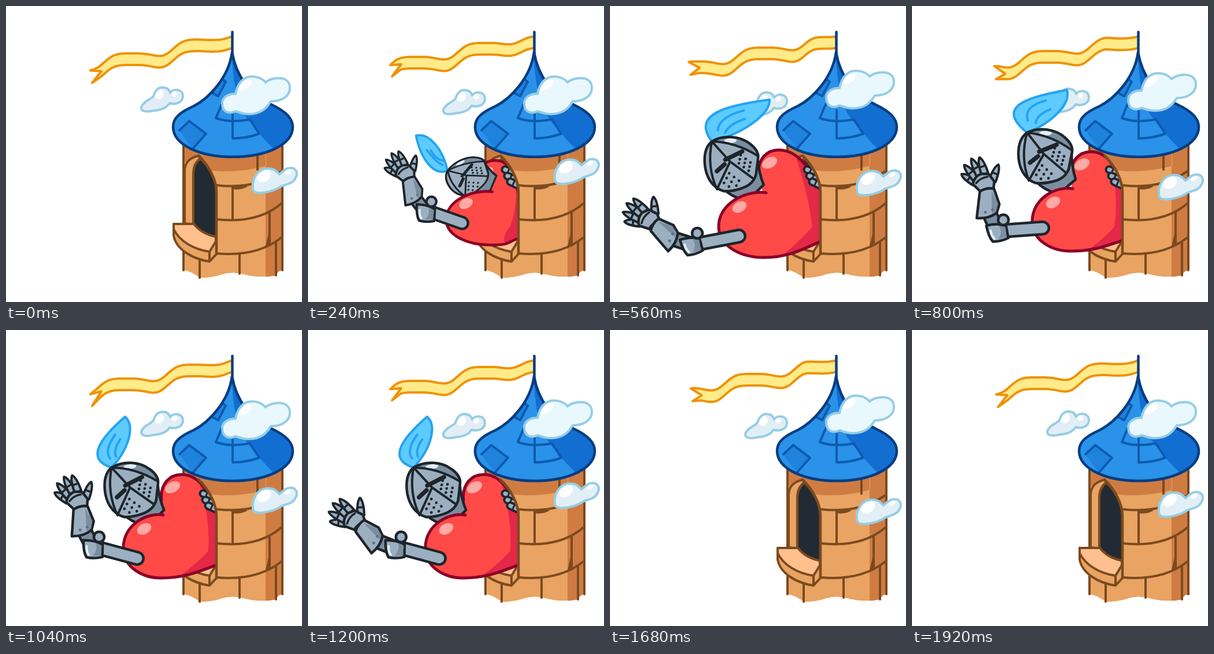
These frames come from a looping animation (512 by 512 pixels, 2000 ms). An HTML page with a canvas:

```html
<!DOCTYPE html>
<html lang="en">
<head>
<meta charset="utf-8">
<title>Knight at the tower</title>
<style>
html, body { margin: 0; width: 100%; height: 100%; overflow: hidden; background: #fff; }
canvas { display: block; width: 100vmin; height: 100vmin; }
</style>
</head>
<body>
<canvas id="stage" width="512" height="512"></canvas>
<script>
const c = document.getElementById('stage').getContext('2d');
const STEP = 80, COUNT = 25, TAU = Math.PI * 2, DEG = Math.PI / 180;
const BROWN = '#7b4a1f', STONE = '#e9a362', SHADE = '#cf7c43';
const INK = '#1d252b', STEEL = '#9bafc0', DARK_STEEL = '#7b8e9f';

function draw(shape, fill, line, width = 4) {
  const p = typeof shape === 'string' ? new Path2D(shape) : shape;
  if (fill) { c.fillStyle = fill; c.fill(p); }
  if (line) { c.strokeStyle = line; c.lineWidth = width; c.stroke(p); }
}
function oval(x, y, rx, ry, turn, fill, line, width) {
  const p = new Path2D();
  p.ellipse(x, y, rx, ry, turn, 0, TAU);
  draw(p, fill, line, width);
}
function scoped(fn) { c.save(); fn(); c.restore(); }
const lerp = (a, b, k) => a + (b - a) * k;
const wave = (f, peak) => Math.cos(TAU * (f - peak) / 12);

// Eased value between [frame, value] keys; values are numbers or arrays
function keyed(keys, f) {
  let i = 0;
  while (i < keys.length - 2 && f > keys[i + 1][0]) i++;
  const [a, va] = keys[i], [b, vb] = keys[i + 1];
  const x = Math.min(1, Math.max(0, (f - a) / (b - a)));
  const k = x * x * (3 - 2 * x);
  return Array.isArray(va) ? va.map((v, n) => lerp(v, vb[n], k)) : lerp(va, vb, k);
}

function flag(f) {
  const end = 141 + 5 * wave(f, 0.5);
  const crest = 314 - 10 * f;
  const mid = x => {
    const grip = Math.min(1, (390 - x) / 55);
    const a = TAU * (x - crest) / 120;
    // the cosine term leans the wave to one side
    return 63 + (390 - x) * 0.2 - 9 * grip * Math.cos(a + 0.5 * (Math.cos(a) - 1));
  };
  const p = new Path2D();
  p.moveTo(390, mid(390) - 10);
  for (let x = 386; x > end + 5; x -= 4) p.lineTo(x, mid(x) - 10);
  p.lineTo(end, mid(end) - 9);
  p.lineTo(end + 19, mid(end + 19) + 1);
  p.lineTo(end + 3, mid(end + 3) + 13);
  for (let x = end + 18; x < 390; x += 4) p.lineTo(x, mid(x) + 10);
  p.lineTo(390, mid(390) + 10);
  draw(p, '#ffeb8a', '#f09104', 4);
}

function tower() {
  const wall = new Path2D('M307 235V457Q318 458 335 470Q355 471 375 464Q392 459 410 464Q440 472 467 466Q470 458 478 457V235Z');
  scoped(() => {
    c.clip(wall);
    draw(wall, STONE);
    draw('M449 230H480V480H449Z M307 235V268Q330 284 375 286Q420 286 450 276V235Z', SHADE);
  });
  draw('M307 240V457M478 240V457M335 432V470M404 430V463M467 408V466M435 259V283M392 314V368M456 358V414' +
    'M364 310Q430 318 476 286M364 369Q436 377 477 341M307 424Q340 433 365 428Q435 434 477 400', null, BROWN, 4);
  draw('M392 317Q408 319 418 312L394 312ZM449 415L456 386V413Z', BROWN);
  draw('M309 376V285C309 270 320 262 333 259L340 270L326 378Z', STONE, BROWN);
  draw('M324 377V290C324 278 329 269 336 264C352 278 364 302 364 322V400Q338 394 324 377Z', '#222b33', BROWN);
  draw('M290 377V397C294 420 320 437 352 442L364 429V400Z', STONE, BROWN);
  draw('M290 377H325Q338 394 363 399V407L352 425C325 421 300 407 290 386Z', '#ffc08d', BROWN);
  draw('M352 425V441', null, BROWN);
}
function jamb() {
  draw('M333 259C350 275 364 300 364 322V429', null, BROWN, 4.5);
}

function roof() {
  const p = new Path2D('M391 80C385 125 350 160 325 173C300 184 289 194 289 209C289 240 335 261 392 261C450 261 496 240 496 209C496 190 475 178 460 171C420 152 398 120 391 80Z');
  const line = '#0c5bb0', tile = '#1f82dc';
  scoped(() => {
    c.clip(p);
    draw(p, '#2a92e9');
    draw('M390 70Q392 150 410 185Q435 220 464 248L510 230V150Z', '#126ed1');
    draw('M354 149L367 156L380 131L370 123', tile, line);
    draw('M300 215L317 199L346 221L323 247', tile, line);
    draw('M373 170L363 194Q378 199 392 199V229Q416 229 438 221L422 196Q408 199 392 199V180', null, line);
  });
  draw(p, null, '#073d82', 4.5);
  draw('M391.500 45V84', null, '#073d82', 4.5);
}

const clouds = {
  big: ['M374 168C374 158 385 151 397 152C400 135 410 122 425 122C438 122 446 128 449 132C460 122 490 120 491 140C492 155 478 165 458 165C450 178 440 187 420 187C408 187 401 183 397 182C387 187 374 185 374 168Z',
    '#e9f8fd', [413, 136, 13, 7]],
  left: ['M234 175C237 165 250 162 255 156C258 145 265 140 272 141C280 141 283 147 284 150C290 142 306 143 306 156C306 168 292 171 283 168C277 178 265 180 255 181C243 184 233 183 234 175Z',
    '#e2eef6', [264, 152, 9, 9], [291, 152, 5, 5]],
  right: ['M427 315C425 300 435 281 453 281C465 281 468 286 473 291C480 285 484 280 493 280C503 281 505 290 501 297C496 308 485 308 476 312C465 320 445 324 437 323C430 323 427 320 427 315Z',
    '#e2eff7', [446, 294, 13, 10], [488, 287, 6, 4]]
};
function cloud([path, fill, ...lights], dy) {
  scoped(() => {
    c.translate(0, dy);
    const p = new Path2D(path);
    draw(p, fill);
    scoped(() => {
      c.clip(p);
      for (const [x, y, rx, ry] of lights) oval(x, y, rx, ry, -0.6, '#fff');
    });
    draw(p, null, '#95cde5', 4);
  });
}

// cleft x y, lobe width, bottom, top x y | head x y turn sx sy | plume tip x y bend | shoulder x y, elbow x y
const tuck = [317, 320, 84, 417, 322, 263, 273, 291, -32, .84, .68, 178, 218, 0, 262, 377, 197, 357];
const lunge = [273, 334, 90, 446, 273, 248, 199, 294, -6, 1, 1, 257, 184, 1, 223, 420, 147, 457];
const lean = [270, 323, 82, 435, 292, 249, 211, 273, -4, 1, 1, 276, 162, 1.6, 223, 398, 142, 412];
const rest = [278, 316, 70, 424, 310, 252, 231, 260, 0, 1, 1, 268, 145, 2.2, 226, 384, 149, 389];
const settle = [272, 320, 69, 429, 304, 250, 218, 276, -5, 1, 1, 206, 150, 1.1, 227, 395, 152, 377];
const poses = [[3, tuck], [5, lunge], [7, lean], [10, rest], [13, settle], [15, settle], [17, tuck], [20, tuck]];
const reach = [[1, 0], [3, .95], [4, 1], [17, 1], [20, 0]];
const swing = [[3, -28], [5, -47], [7.5, -64], [10, -15], [11.5, -2], [13, -18], [15, -58], [17, -21], [20, -20]];

function plume(bx, by, tx, ty, bend) {
  const dx = tx - bx, dy = ty - by, len = Math.hypot(dx, dy);
  const at = (k, off) => [bx + dx * k + dy / len * off, by + dy * k - dx / len * off];
  const p = new Path2D();
  p.moveTo(bx, by);
  p.bezierCurveTo(...at(.1 - bend * .07, 24 + bend * 24), ...at(.52, 24 + bend * 5), tx, ty);
  p.bezierCurveTo(...at(.88, -22), ...at(.4, -20), bx, by);
  draw(p, '#5dcbff', '#23a3f2', 4);
  const veins = new Path2D();
  veins.moveTo(...at(.16, bend * 6));
  veins.quadraticCurveTo(...at(.28, 5 + bend * 14), ...at(.62, 3 + bend * 5));
  veins.moveTo(...at(.22, -6 + bend * 3));
  veins.quadraticCurveTo(...at(.34, 2 + bend * 3), ...at(.56, -2));
  draw(veins, null, '#23a3f2', 4);
}

function helmet() {
  draw('M-20 40Q0 62 24 64L52 40Q45 18 45 -8Z', DARK_STEEL, INK, 4.5);
  const shell = new Path2D('M-32 -41C-12 -51 17 -48 34 -32C43 -24 47 -15 46 -8L40 22Q34 38 15 43Q-2 48 -18 46C-39 38 -47 16 -47 -4C-47 -20 -42 -34 -32 -41Z');
  scoped(() => {
    c.clip(shell);
    draw(shell, STEEL);
    draw('M-32 -41Q10 -37 46 -10L50 -50H-32Z', DARK_STEEL);
    oval(0, -40, 11, 4, 0, '#e3eff7');
  });
  draw(shell, null, INK, 4.5);
  draw('M-32 -41Q-44 2 -29 42M-32 -41Q10 -37 46 -10M-32 -41L-3 -4L36 29M-3 -4L-29 42', null, INK, 4);
  draw('M-27 11L-13 0M-11 -8L19 -20', null, INK, 7.5);
  for (let i = 0; i < 3; i++) {
    for (let j = 0; j < 3; j++) {
      oval(12 + i * 8 + j * 2, 0 + i * 7 - j * 7, 2.4, 2.4, 0, INK);
      oval(-6 + i * 8 - j * 5, 16 + i * 7 + j * 8, 2.4, 2.4, 0, INK);
    }
  }
}

function finger(x, y, tx, ty) {
  const dx = tx - x, dy = ty - y, n = 6 / Math.hypot(dx, dy);
  const nx = -dy * n, ny = dx * n;
  const p = new Path2D();
  p.moveTo(x + nx, y + ny);
  p.quadraticCurveTo(x + dx * .8 + nx, y + dy * .8 + ny, tx, ty);
  p.quadraticCurveTo(x + dx * .8 - nx, y + dy * .8 - ny, x - nx, y - ny);
  p.closePath();
  draw(p, STEEL, INK, 4);
  const mx = x + dx * .45, my = y + dy * .45;
  draw(`M${mx + nx * .8} ${my + ny * .8}L${mx - nx * .8} ${my - ny * .8}`, null, INK, 3.5);
}

function hand() {
  finger(-17, -18, -35, -38);
  finger(-13, -23, -26, -52);
  finger(-5, -27, -11, -59);
  finger(4, -27, 3, -57);
  finger(13, -12, 31, -36);
  draw('M-12 0L-21 -16Q-15 -28 -2 -29L10 -25L16 -10L11 2Q0 -4 -12 0Z', STEEL, INK, 4.5);
  draw('M-15 -16Q-5 -23 7 -21', null, INK, 3.5);
}

function arm(sx, sy, ex, ey, angle, size) {
  scoped(() => {
    c.translate(ex, ey);
    c.rotate(angle * DEG);
    c.scale(size, size);
    draw('M-13 0L-19 -34H5L11 0Z', DARK_STEEL, INK, 4.5);
    scoped(() => {
      c.translate(0, -74);
      c.rotate((-18 - angle) * .45 * DEG);
      hand();
    });
    draw('M-30 -31L-13 -74Q0 -78 12 -72L14 -44L6 -31Q-10 -24 -30 -31Z', STEEL, INK, 4.5);
    draw('M7 -70L12 -46L6 -34L-3 -31Z', DARK_STEEL);
    oval(-13, -37, 2.5, 2.5, 0, '#617485');
    oval(0, -38, 2.5, 2.5, 0, '#617485');
  });
  const limb = `M${sx} ${sy}L${ex + 8} ${ey}`;
  draw(limb, null, INK, 26);
  draw(limb, null, STEEL, 17);
  scoped(() => {
    c.translate(ex, ey);
    c.rotate(Math.atan2(sy - ey, sx - ex) * .7);
    draw('M-20 -10Q0 -14 14 -8L17 13Q3 19 -10 18Q-17 10 -20 -10Z', STEEL, INK, 4.5);
    draw('M2 -9L13 -6L14 11L0 14Q8 3 2 -9Z', DARK_STEEL);
    draw('M-13 -1Q-12 8 -7 13', null, '#e3eff7', 4);
  });
  oval(ex + 9, ey - 19, 9, 9, 0, STEEL, INK, 4.5);
}

function knight(f) {
  const size = keyed(reach, f);
  if (size < .02) return;
  const [cx, cy, w, bottom, ux, uy, hx, hy, turn, sx, sy, px, py, bend, ax, ay, ex, ey] = keyed(poses, f);
  const h = bottom - cy, left = cx - w;
  const upper = `M${ux - 35} ${uy + 45}C${ux - 38} ${uy + 15} ${ux - 20} ${uy} ${ux} ${uy}C${ux + 38} ${uy} 360 ${uy + 48} 374 ${uy + 100}`;
  const lower = `M${cx} ${cy}C${cx - w * .42} ${cy - 5} ${left} ${cy + h * .16} ${left} ${cy + h * .52}` +
    `C${left} ${cy + h * .84} ${cx - w * .5} ${bottom} ${cx - 4} ${bottom}C${cx + 42} ${bottom} 340 ${lerp(bottom, 403, .55)} 376 402`;
  const upperFill = new Path2D(upper + `L376 402L${cx} ${cy + 20}Z`);
  const lowerFill = new Path2D(lower + `L374 ${uy + 80}Z`);
  const red = '#ff4a47', edge = '#8b0028', glint = '#ffaaa6';
  const shade = () => draw(`M${ux + 25} ${uy}Q${ux + 50} 318 350 382Q333 402 ${cx + 24} ${bottom}H380V${uy}Z`, '#e32848');

  scoped(() => {
    c.translate(355, 345);
    c.scale(size, size);
    c.translate(-355, -345);
    draw(upperFill, red);
    scoped(() => { c.clip(upperFill); shade(); });
    draw(upper, null, edge, 5);
    oval(ux - 16, uy + 22, 14, 9, -.5, glint);

    const r = turn * DEG;
    const bx = hx - 32 * sx * Math.cos(r) + 41 * sy * Math.sin(r);
    const by = hy - 32 * sx * Math.sin(r) - 41 * sy * Math.cos(r);
    plume(bx, by, px, py, bend);
    scoped(() => {
      c.translate(hx, hy);
      c.rotate(r);
      c.scale(sx, sy);
      helmet();
    });

    draw(lowerFill, red);
    scoped(() => { c.clip(lowerFill); shade(); });
    draw(lower, null, edge, 5);
    oval(left + 36, cy + h * .22, 13, 9, -.5, glint);
    arm(ax, ay, ex, ey, keyed(swing, f), lerp(.93, 1, (sx - .84) / .16));
  });
}

function grip(f) {
  if (f < 1 || f > 18) return;
  const slide = f < 3 ? (3 - f) * 4 : f > 17 ? 8 : 0;
  for (const [x, y] of [[341, 283], [345, 294], [350, 304]]) {
    const p = `M${x + slide} ${y}L${x + slide + 13} ${y + 6}`;
    draw(p, null, INK, 15);
    draw(p, null, STEEL, 7);
    draw(`M${x + slide + 7} ${y - 1}L${x + slide + 4} ${y + 6}`, null, INK, 3);
  }
}

function render(f) {
  c.fillStyle = '#fff';
  c.fillRect(0, 0, 512, 512);
  c.lineJoin = c.lineCap = 'round';
  flag(f);
  tower();
  roof();
  cloud(clouds.left, 4.5 - 4.5 * wave(f, 0));
  scoped(() => {
    c.clip(new Path2D('M0 0H333V259C350 275 364 300 364 322V512H0Z'));
    knight(f);
    grip(f);
  });
  jamb();
  cloud(clouds.big, 6 * wave(f, 1.5) - 4.2);
  cloud(clouds.right, 14 * wave(f, 9.2) - 1.5);
}

function tick() {
  render(Math.floor(performance.now() / STEP) % COUNT);
  requestAnimationFrame(tick);
}
tick();
</script>
</body>
</html>
```
